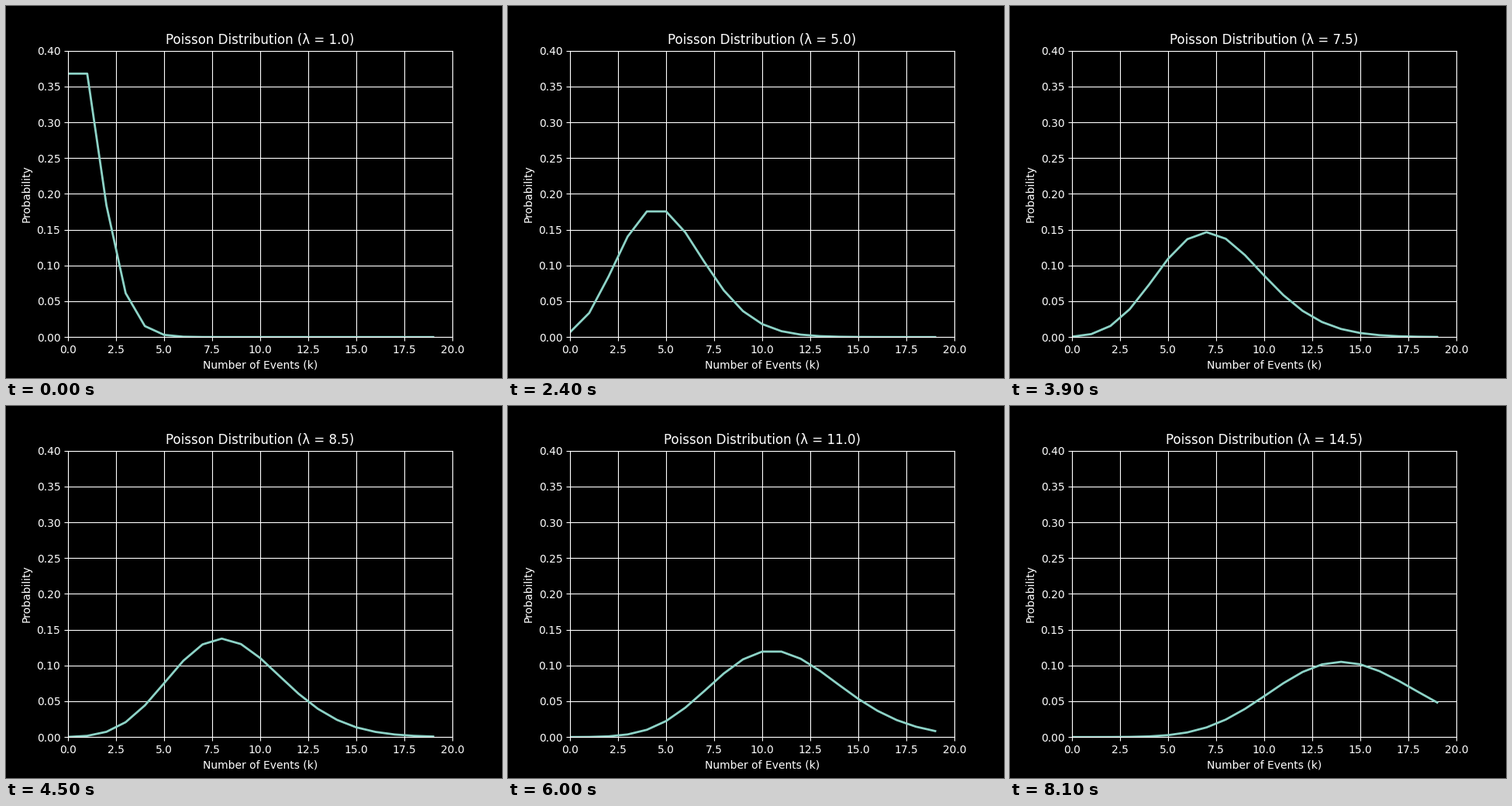
These frames come from a looping animation (640x480 px, 8400 ms). A matplotlib script:

```python
import math

import matplotlib.pyplot as plt
import numpy as np
from matplotlib.animation import FuncAnimation

FRAMES = 28
INTERVAL = 300  # ms

plt.style.use("dark_background")
plt.rcParams["font.family"] = "DejaVu Sans"

k = np.arange(20)
factorials = np.array([float(math.factorial(n)) for n in k])


def poisson(rate):
    return rate ** k * math.exp(-rate) / factorials


fig, ax = plt.subplots(figsize=(6.4, 4.8), dpi=100)
ax.set_xlim(0, 20)
ax.set_ylim(0, 0.4)
ax.set_xlabel("Number of Events (k)")
ax.set_ylabel("Probability")
ax.grid(True)
line, = ax.plot(k, poisson(1.0), lw=2)
title = ax.set_title("Poisson Distribution (λ = 1.0)")


def update(i):
    rate = 1 + 0.5 * i
    line.set_ydata(poisson(rate))
    title.set_text(f"Poisson Distribution (λ = {rate:.1f})")
    return line, title


anim = FuncAnimation(fig, update, frames=FRAMES, interval=INTERVAL,
                     init_func=lambda: update(0), repeat=True, repeat_delay=0)
plt.show()
```
